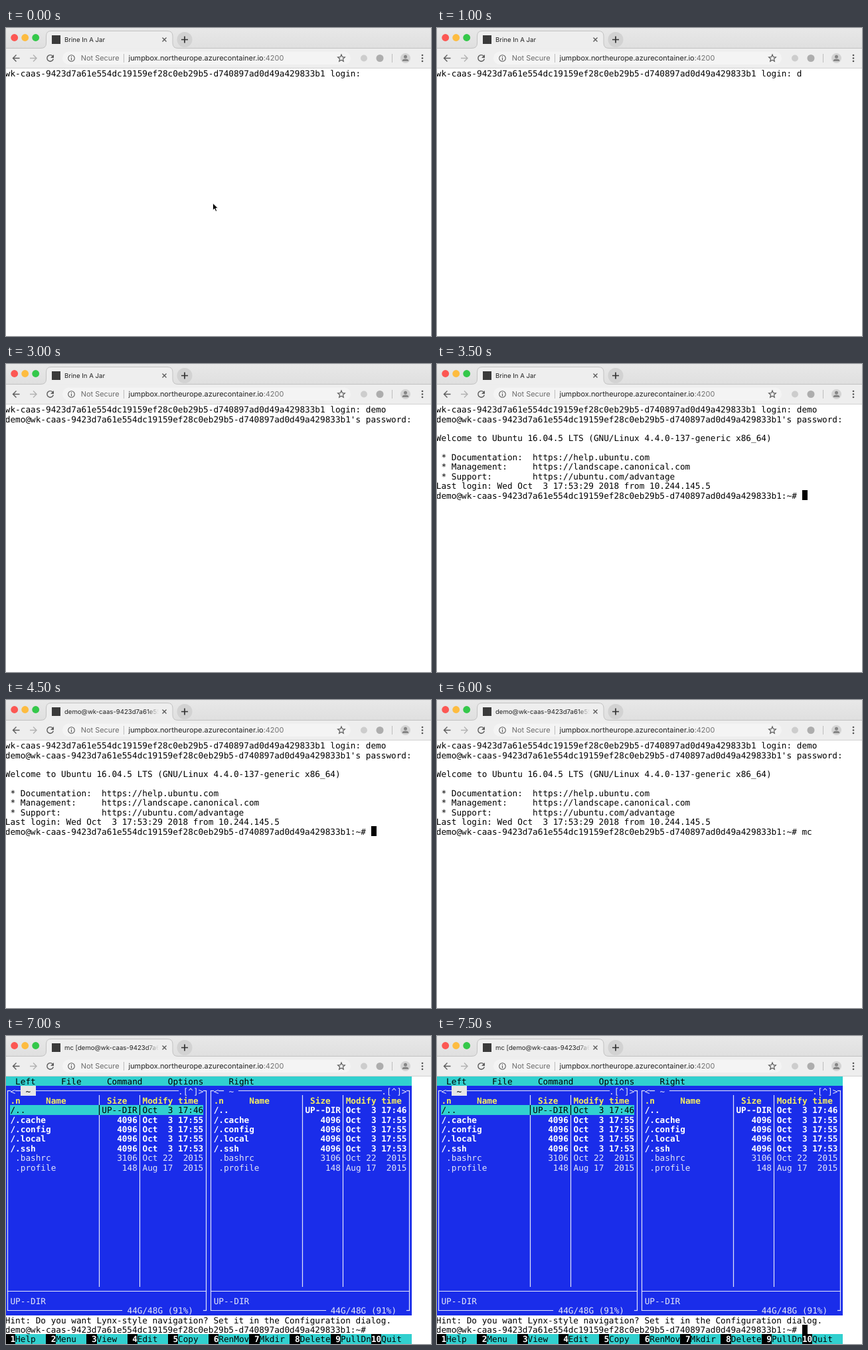
An HTML page for the animation above (8 s loop, 640 px wide and 464 px high).

```html
<!DOCTYPE html>
<html lang="en">
<head>
<meta charset="utf-8">
<title>Web terminal</title>
<style>
  html, body { margin: 0; width: 100%; height: 100%; overflow: hidden; background: #fff; }
  svg { display: block; width: 640px; height: 464px; }
  text { white-space: pre; text-rendering: geometricPrecision; }
  .ui { font: 10.92px Inter, Roboto, sans-serif; }
  #title { font-size: 9.6px; fill: #222; }
  #term { font: 12.715px "DejaVu Sans Mono", "Liberation Mono", monospace; }
  .icon { fill: none; stroke: #5c5c5c; stroke-width: 1.4; }
</style>
</head>
<body>
<svg viewBox="0 0 640 464">
  <defs>
    <linearGradient id="strip" x2="0" y2="1">
      <stop stop-color="#e8e8e8"/><stop offset="1" stop-color="#dfdfdf"/>
    </linearGradient>
    <linearGradient id="fade" gradientUnits="userSpaceOnUse" x1="212" x2="230">
      <stop stop-color="#fff"/><stop offset="1" stop-color="#000"/>
    </linearGradient>
    <mask id="titleMask" maskUnits="userSpaceOnUse" x="60" y="4" width="170" height="26">
      <rect x="60" y="4" width="170" height="26" fill="url(#fade)"/>
    </mask>
  </defs>

  <rect width="640" height="31" fill="url(#strip)"/>
  <rect y="30" width="640" height="31" fill="#eeeeee"/>
  <path d="M-2 30.5H52Q60.5 30.5 60.5 23V12Q60.5 4.5 68 4.5H243Q251 4.5 251 12V23Q251 30.5 259 30.5H642"
        fill="#eeeeee" stroke="#c2c2c2"/>
  <path d="M0 60.5H640" stroke="#d2d2d2"/>

  <circle cx="12.7" cy="14.5" r="5.4" fill="#fc5753"/>
  <circle cx="28.7" cy="14.5" r="5.4" fill="#fdbc40"/>
  <circle cx="44.7" cy="14.5" r="5.4" fill="#34c84a"/>

  <rect x="69" y="11" width="13" height="13" fill="#3a3a3a"/>
  <g class="ui" mask="url(#titleMask)"><text id="title" x="88" y="20.8"></text></g>
  <path class="icon" d="M235.5 14.5l6 6m0-6l-6 6"/>
  <circle cx="269" cy="17.5" r="11.5" fill="#d2d2d2"/>
  <path d="M264 17.5h10m-5-5v10" stroke="#333" stroke-width="1.7"/>

  <path class="icon" d="M20.5 45.5H10.5m5-5l-5 5l5 5"/>
  <path class="icon" style="stroke:#b2b2b2" d="M36 45.5h10m-5-5l5 5l-5 5"/>
  <path class="icon" d="M70.3 42.3A4.8 4.8 0 1 0 71.3 46.5"/>
  <path d="M72 40v5h-5z" fill="#5c5c5c"/>

  <rect x="85" y="35.5" width="434" height="19.5" rx="9.7" fill="#f4f4f4"/>
  <circle class="icon" style="stroke-width:1.1" cx="98.5" cy="45.5" r="4.8"/>
  <path d="M98.5 42.5v1.3m0 1v3.6" stroke="#5c5c5c" stroke-width="1.2"/>
  <g class="ui">
    <text x="112.8" y="49.3" fill="#6c6c6c">Not Secure</text>
    <text x="184.5" y="49.3" fill="#222">jumpbox.northeurope.azurecontainer.io<tspan fill="#707070">:4200</tspan></text>
  </g>
  <path d="M177.5 39v13M581.5 39v13" stroke="#bdbdbd"/>
  <path id="star" class="icon" style="stroke-width:1.2"/>
  <circle cx="539" cy="45.5" r="5" fill="#cdcdcd"/>
  <circle cx="563" cy="45.5" r="5.5" fill="#adadad"/>
  <circle cx="601.5" cy="45.5" r="7.5" fill="#d3d3d3"/>
  <circle cx="601.5" cy="43.3" r="2.5" fill="#858585"/>
  <path d="M596.8 50v-.8q0-2.6 4.7-2.6t4.7 2.6v.8z" fill="#858585"/>
  <g fill="#555"><circle cx="627" cy="41" r="1.3"/><circle cx="627" cy="45.5" r="1.3"/><circle cx="627" cy="50" r="1.3"/></g>

  <g id="term"></g>
  <path id="pointer" d="M311.5 264V274.6L314 272.3L315.8 276.3L317.6 275.5L315.9 271.6H319.2Z"
        fill="#000" stroke="#fff" stroke-width=".8"/>
</svg>

<script>
const LOOP = 8000, STEP = 500;
const CELL = 7.655, ROW = 14.38, LEFT = -1.2, TOP = 61;
const CYAN = '#31d0cf', BLUE = '#1a2dea', PALE = '#e4e7f8', YELLOW = '#f5ee60';
const HOST = 'wk-caas-9423d7a61e554dc19159ef28c0eb29b5-d740897ad0d49a429833b1';
const USER = 'demo';
const PROMPT = `${USER}@${HOST}:~# `;

const $ = id => document.getElementById(id);
const x = col => LEFT + col * CELL;
const y = row => TOP + row * ROW;
const snap = v => Math.floor(v) + .5;
const esc = s => s.replace(/&/g, '&amp;').replace(/</g, '&lt;');

const text = (col, row, s, fill = '#000', bold = false) =>
  `<text x="${x(col)}" y="${y(row) + 12.2}" fill="${fill}"${bold ? ' font-weight="700"' : ''}>${esc(s)}</text>`;
const block = (col, row, w, h, fill) =>
  `<rect x="${x(col)}" y="${y(row)}" width="${w * CELL}" height="${h * ROW}" fill="${fill}" shape-rendering="crispEdges"/>`;
const line = (c1, r1, c2, r2, color = PALE) =>
  `<path d="M${snap(x(c1))} ${snap(y(r1))}L${snap(x(c2))} ${snap(y(r2))}" stroke="${color}" stroke-width="1.2" stroke-linecap="square"/>`;

const FILES = [
  ['/..', 'UP--DIR', 'Oct  3 17:46'],
  ['/.cache', '4096', 'Oct  3 17:55'],
  ['/.config', '4096', 'Oct  3 17:55'],
  ['/.local', '4096', 'Oct  3 17:55'],
  ['/.ssh', '4096', 'Oct  3 17:53'],
  [' .bashrc', '3106', 'Oct 22  2015'],
  [' .profile', '148', 'Aug 17  2015']
];
const MENU = [[2, 'Left'], [11, 'File'], [20, 'Command'], [32, 'Options'], [44, 'Right']];
const KEYS = 'Help Menu View Edit Copy RenMov Mkdir Delete PullDn Quit'.split(' ');

function panel(c, active) {
  const l = c + .5, r = c + 39.5;
  let out = line(l, 1.5, c + 1, 1.5) + line(c + 2, 1.5, c + 3, 1.5) + line(c + 6, 1.5, c + 34, 1.5)
    + line(c + 39, 1.5, r, 1.5) + line(l, 1.5, l, 24.5) + line(r, 1.5, r, 24.5)
    + line(l, 22.5, r, 22.5) + line(l, 24.5, c + 23, 24.5) + line(c + 39, 24.5, r, 24.5)
    + line(c + 18.5, 2, c + 18.5, 22) + line(c + 26.5, 2, c + 26.5, 22);
  if (active) out += block(c + 3, 1, 3, 1, '#e6e6e6') + block(c + 1, 3, 38, 1, CYAN)
    + line(c + 18.5, 3, c + 18.5, 4, '#000') + line(c + 26.5, 3, c + 26.5, 4, '#000');
  out += text(c + 1, 1, '<', PALE) + text(c + 4, 1, '~', active ? '#000' : PALE) + text(c + 34, 1, '.[^]>', PALE);
  for (const [col, s] of [[1, '.n'], [8, 'Name'], [20, 'Size'], [27, 'Modify time']])
    out += text(c + col, 2, s, YELLOW, true);
  FILES.forEach(([name, size, date], i) => {
    const picked = active && i === 0, bold = !picked && name[0] === '/';
    const fill = picked ? '#000' : bold ? '#fff' : PALE;
    out += text(c + 1, i + 3, name, fill, bold) + text(c + 26 - size.length, i + 3, size, fill, bold)
      + text(c + 27, i + 3, date, fill, bold);
  });
  return out + text(c + 1, 23, 'UP--DIR', PALE) + text(c + 24, 24, '44G/48G (91%)', PALE);
}

function manager() {
  let out = block(0, 0, 80, 1, CYAN) + block(0, 1, 80, 24, BLUE);
  for (const [col, s] of MENU) out += text(col, 0, s);
  out += panel(0, true) + panel(40, false)
    + text(0, 25, 'Hint: Do you want Lynx-style navigation? Set it in the Configuration dialog.')
    + text(0, 26, PROMPT) + block(0, 27, 80, 1, CYAN);
  KEYS.forEach((s, i) => {
    out += block(i * 8, 27, 2, 1, '#000')
      + text(i * 8, 27, String(i + 1).padStart(2), '#fff', true) + text(i * 8 + 2, 27, s);
  });
  return out;
}

function shell(typed, asked, welcome, command) {
  const rows = [`${HOST} login: ${typed}`];
  if (asked) rows.push(`${USER}@${HOST}'s password:`);
  if (welcome) rows.push('', 'Welcome to Ubuntu 16.04.5 LTS (GNU/Linux 4.4.0-137-generic x86_64)', '',
    ' * Documentation:  https://help.ubuntu.com',
    ' * Management:     https://landscape.canonical.com',
    ' * Support:        https://ubuntu.com/advantage',
    'Last login: Wed Oct  3 17:53:29 2018 from 10.244.145.5',
    PROMPT + command);
  return rows.map((s, i) => text(0, i, s)).join('');
}

const IDLE = 'Brine In A Jar', LOGGED = `${USER}@${HOST}`;
// start time, tab title, screen, caret column and row
const SCENES = [
  [0, IDLE, shell(''), 71, 0],
  [1000, IDLE, shell(USER[0]), 72, 0],
  [1500, IDLE, shell(USER, true), 0, 2],
  [3500, IDLE, shell(USER, true, true, ''), 72, 9],
  [4000, LOGGED, shell(USER, true, true, ''), 72, 9],
  [6000, LOGGED, shell(USER, true, true, 'mc'), 74, 9],
  [6500, `mc [${LOGGED}]`, manager(), 72, 26]
];

$('star').setAttribute('d', 'M' + Array.from({ length: 10 }, (_, i) => {
  const a = i * Math.PI / 5, r = i % 2 ? 2.5 : 5.6;
  return `${505 + r * Math.sin(a)} ${45.7 - r * Math.cos(a)}`;
}).join('L') + 'Z');

let shown = -1;
function draw() {
  const t = performance.now() % LOOP, step = Math.floor(t / STEP);
  if (step !== shown) {
    shown = step;
    const [, title, screen, col, row] = SCENES.filter(s => s[0] <= t).pop();
    const caret = step % 2 ? block(col, row, 1, 1, '#000') : '';
    $('title').textContent = title;
    $('term').innerHTML = screen + caret;
    $('pointer').style.display = t < 1000 ? '' : 'none';
  }
  requestAnimationFrame(draw);
}
draw();
</script>
</body>
</html>
```
